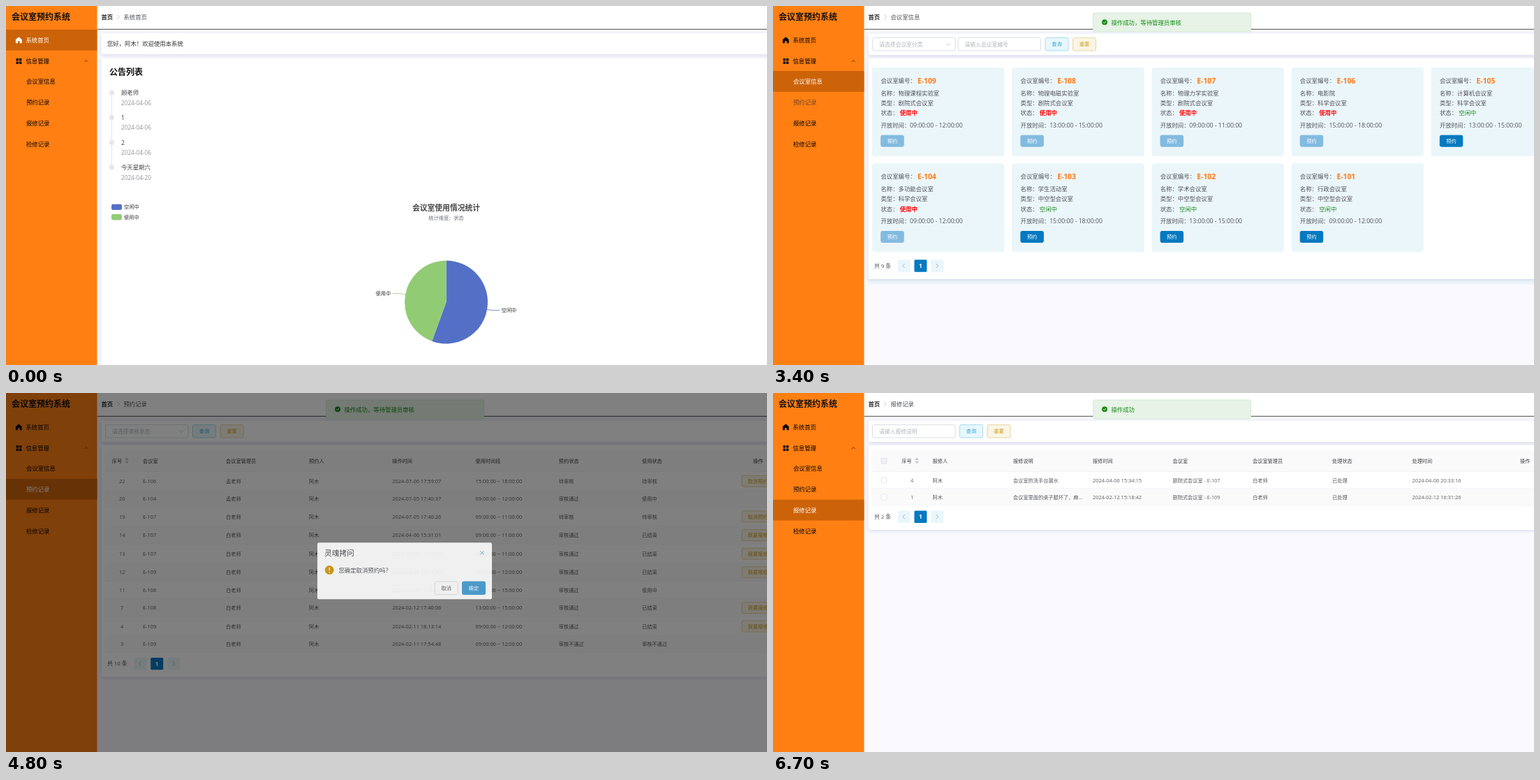
Animation, 1090 px wide and 514 px high, one loop 8 s. Source, as an HTML page:

```html
<!DOCTYPE html>
<html>
<head>
<meta charset="utf-8">
<title>会议室预约系统</title>
<style>
html, body { margin: 0; width: 100%; height: 100%; overflow: hidden; background: #f9f9fe; }
svg { display: block; width: 1090px; height: 514px; font-family: "Open Sans", "Noto Sans CJK SC", "Noto Sans CJK", sans-serif; }
.panel { fill: #fff; filter: drop-shadow(0 1px 2.5px rgba(80, 90, 160, .22)); }
</style>
</head>
<body>
<svg id="stage" viewBox="0 0 1090 514"></svg>
<script>
const LOOP = 8000;
const BLUE = '#0579c1', PALE = '#e9f6fb', GOLD = '#d0980f';
const USER = '阿木', MANAGERS = ['孟老师', '白老师'];

// ---------- drawing helpers ----------
const isLatin = s => /^[\x20-~]+$/.test(s);

function text(x, y, s, size = 8.4, fill = '#505256', extra = '') {
  const px = isLatin(s) ? size * 1.03 : size;
  return `<text x="${x}" y="${y + size * .37}" font-size="${px}" fill="${fill}" ${extra}>${s}</text>`;
}
const MID = 'text-anchor="middle"', BOLD = 'font-weight="700"', MEDIUM = 'font-weight="500"';

const rect = (x, y, w, h, fill, rx = 0, extra = '') =>
  `<rect x="${x}" y="${y}" width="${w}" height="${h}" fill="${fill}" rx="${rx}" ${extra}/>`;
const line = (d, stroke, width = .8, extra = '') =>
  `<path d="${d}" fill="none" stroke="${stroke}" stroke-width="${width}" ${extra}/>`;
const group = (id, body, extra = '') => `<g id="${id}" ${extra}>${body}</g>`;
const panel = (top, bottom) => `<rect class="panel" x="136.5" y="${top}" width="970" height="${bottom - top}" rx="2"/>`;

function button(x, y, w, h, label, bg, ink, border = bg, extra = '') {
  return rect(x + .5, y + .5, w - 1, h - 1, bg, 2, `stroke="${border}"`) +
    text(x + w / 2, y + h / 2, label, 7.2, ink, MID + ' ' + extra);
}
const goldButton = (x, y, w, h, label) => button(x, y, w, h, label, '#faf5e4', '#cf9a1c', '#e8d6a6', MEDIUM);

const field = (x, hint) =>
  rect(x + .5, 45.5, 118.5, 18.5, '#fff', 2, 'stroke="#dcdfe6"') + text(x + 10, 54.7, hint, 7.8, '#b3b6be');
const arrowDown = line('M248 53.5l3 3 3-3', '#b3b6be');
const searchButtons = x =>
  button(x, 45, 34, 19.5, '查询', '#e8f7fc', '#2fa6d4', '#a6ddee', MEDIUM) + goldButton(x + 39.5, 45, 34, 19.5, '重置');

function pager(count, y) {
  const x = count > 9 ? 183.5 : 178.7;
  return text(145, y, `共 ${count} 条`, 7.8) +
    rect(x, y - 8.7, 18, 17.4, PALE, 1.5) + line(`M${x + 10} ${y - 3}l-3 3 3 3`, '#9aa4b4') +
    rect(x + 23.7, y - 8.7, 18, 17.4, BLUE, 1.5) + text(x + 32.7, y, '1', 8, '#fff', MID + ' ' + BOLD) +
    rect(x + 47.5, y - 8.7, 18, 17.4, PALE, 1.5) + line(`M${x + 55} ${y - 3}l3 3-3 3`, '#9aa4b4');
}
const sorter = x => `<path d="M${x - 3} 96l3-3.2 3 3.2zM${x - 3} 97.8l3 3.2 3-3.2z" fill="#c0c4cc"/>`;

// ---------- sidebar and header ----------
const MENU = [['系统首页', 48.7], ['会议室信息', 107.9], ['预约记录', 137.8], ['报修记录', 167.6], ['检修记录', 197.4]];

const sidebar = rect(0, 0, 130.5, 514, '#ff7f12') +
  text(8, 16, '会议室预约系统', 12, '#111', BOLD) +
  MENU.map(([, y], i) => rect(0, y - 14.9, 130.5, 29.8, '#cc6309', 0, `id="bar${i}"`)).join('') +
  MENU.map(([s, y], i) => text(i ? 29 : 28.5, y, s, 8.4, '#000', `id="item${i}"`)).join('') +
  '<path id="house" d="M18.3 44.3l4.4 3.8v5.2h-3v-3h-2.8v3h-3v-5.2z"/>' +
  [0, 1, 2, 3].map(i => rect(14.5 + i % 2 * 4.4, 75 + (i >> 1) * 4.4, 3.5, 3.5, '#111', .5)).join('') +
  text(28.5, 78.7, '信息管理', 8.4, '#000') + line('M112.5 80.2l2.6-2.6 2.6 2.6', '#4a2a0c');

const header = rect(130.5, 0, 960, 33, '#fff') + rect(130.5, 32.8, 960, 1, '#4b4d50') +
  text(136.5, 15.6, '首页', 8.4, '#303133', BOLD) + line('M159.5 12.5l3 3.2-3 3.2', '#b8bcc5') +
  MENU.slice(0, 4).map(([s], i) => group('crumb' + i, text(168.5, 15.6, s))).join('');

// ---------- pages ----------
function homePage() {
  const notices = [['顾老师', '2024-04-06'], ['1', '2024-04-06'], ['2', '2024-04-06'], ['今天星期六', '2024-04-20']];
  const cx = 630.5, cy = 424, r = 59.5, a = Math.PI * 10 / 9;
  const end = `${cx + r * Math.sin(a)} ${cy - r * Math.cos(a)}`;
  return panel(39, 69) + text(145, 54.3, `您好，${USER}！欢迎使用本系统`, 8.4, '#303133') + panel(74.5, 530) +
    text(148, 95, '公告列表', 12, '#111', BOLD) + rect(150.8, 124, 1.3, 107, '#e4e7ed') +
    notices.map(([s, day], i) => {
      const y = 124 + i * 35.7;
      return `<circle cx="151.5" cy="${y}" r="3.6" fill="#e4e7ed"/>` +
        text(165, y, s, 8.4, '#404246') + text(165, y + 14.6, day, 8, '#909399');
    }).join('') +
    rect(151, 283.7, 15, 8.4, '#5470c6', 2.4) + text(169, 287.6, '空闲中', 7.2, '#333') +
    rect(151, 298, 15, 8.4, '#91cc75', 2.4) + text(169, 302, '使用中', 7.2, '#333') +
    text(cx, 289, '会议室使用情况统计', 10.8, '#464646', MID + ' ' + BOLD) +
    text(cx, 303.6, '统计维度：状态', 7.2, '#6e7079', MID) +
    `<path d="M${cx} ${cy}V${cy - r}A${r} ${r} 0 1 1 ${end}z" fill="#5470c6"/>` +
    `<path d="M${cx} ${cy}V${cy - r}A${r} ${r} 0 0 0 ${end}z" fill="#91cc75"/>` +
    line('M572 413.5Q566 411.6 563 411.6H554', '#91cc75') + text(529.5, 411.2, '使用中', 7.2, '#333') +
    line('M689 434.3Q694 435.8 698 435.8H707', '#5470c6') + text(709.7, 435.2, '空闲中', 7.2, '#333') +
    '<path d="M1091 9.5l-2 2-3 1.5 2 2.5 1 4h2z" fill="#86c932"/>';
}

const ROOMS = `物理课程实验室,剧院式,1,09:00:00 - 12:00:00
物理电磁实验室,剧院式,1,13:00:00 - 15:00:00
物理力学实验室,剧院式,1,09:00:00 - 11:00:00
电影院,科学,0,15:00:00 - 18:00:00
计算机会议室,科学,0,13:00:00 - 15:00:00
多功能会议室,科学,1,09:00:00 - 12:00:00
学生活动室,中空型,0,15:00:00 - 18:00:00
学术会议室,中空型,0,13:00:00 - 15:00:00
行政会议室,中空型,0,09:00:00 - 12:00:00`.split('\n').map(s => s.split(','));

const cardAt = i => [142 + i % 5 * 200.15, i < 5 ? 88 : 225.3];

function roomState(i, busy) {
  const [x, y] = cardAt(i);
  return text(x + 39.7, y + 65.3, busy ? '使用中' : '空闲中', 8.4, busy ? '#f00' : '#1c8a1c', busy ? BOLD : MEDIUM) +
    button(x + 12.2, y + 96.7, 33.5, 17, '预约', busy ? '#82bbe0' : BLUE, '#fff');
}

function roomCard([name, type, busy, hours], i) {
  const [x, y] = cardAt(i), tx = x + 12.4;
  const state = i === 3 ? group('free', roomState(i, false)) + group('taken', roomState(i, true)) : roomState(i, busy === '1');
  return rect(x, y, 189.5, 127, '#ebf6fb', 4) + text(tx, y + 19, '会议室编号：') +
    text(x + 65, y + 18.8, 'E-' + (109 - i), 10, '#ff7a14', BOLD) +
    text(tx, y + 36.8, '名称：' + name) + text(tx, y + 51, `类型：${type}会议室`) + text(tx, y + 65.3, '状态：') +
    text(tx, y + 82.4, '开放时间：') + text(x + 54, y + 82.4, hours) + state;
}

const roomsPage = () => rect(136.5, 391, 960, 8, '#edf5fb') + panel(39.5, 70) + field(142, '请选择会议室分类') + arrowDown +
  field(264.5, '请输入会议室编号') + searchButtons(389.5) + panel(74.5, 391) +
  group('cards', ROOMS.map(roomCard).join('') + pager(9, 372));

const HEAD_END = 112.9;
const tableHead = (xs, names) => rect(142, 82, 950, HEAD_END - 82, '#fafafb') +
  names.map((s, i) => text(xs[i], 97.5, s, 7.2, '#404246', MEDIUM)).join('') + rect(142, HEAD_END - .4, 950, .6, '#ebeef5');

const RECORDS = `22,E-106,0,2024-07-06 17:59:07,15:00:00 ~ 18:00:00,待审核,待审核,取消预约
20,E-104,0,2024-07-05 17:40:37,09:00:00 ~ 12:00:00,审核通过,使用中,
19,E-107,1,2024-07-05 17:40:26,09:00:00 ~ 11:00:00,待审核,待审核,取消预约
14,E-107,1,2024-04-06 15:31:01,09:00:00 ~ 11:00:00,审核通过,已结束,我要报修
13,E-107,1,2024-04-06 13:17:59,09:00:00 ~ 11:00:00,审核通过,已结束,我要报修
12,E-109,1,2024-04-06 13:17:40,09:00:00 ~ 12:00:00,审核通过,已结束,我要报修
11,E-108,1,2024-04-06 10:38:02,13:00:00 ~ 15:00:00,审核通过,使用中,
7,E-108,1,2024-02-12 17:40:06,13:00:00 ~ 15:00:00,审核通过,已结束,我要报修
4,E-109,1,2024-02-11 18:13:14,09:00:00 ~ 12:00:00,审核通过,已结束,我要报修
3,E-109,1,2024-02-11 17:54:48,09:00:00 ~ 12:00:00,审核不通过,审核不通过,`.split('\n').map(s => s.split(','));

function recordTable(rows, prefix) {
  const xs = [196, 315, 434, 553.3, 672.5, 791.8, 911];
  let y = HEAD_END, body = '';
  rows.forEach(([id, room, who, when, slot, review, use, action], i) => {
    const h = action ? 26.6 : 24.1, c = y + h / 2;
    const cells = [room, MANAGERS[who], USER, when, slot, review, use];
    body += rect(142, y, 950, h, i % 2 ? '#fafafa' : '#fff') +
      rect(142, y, 950, h, '#f3f5f9', 0, `id="${prefix}${id}" opacity="0"`) +
      rect(142, y + h - .5, 950, .6, '#ebeef5') + text(166.2, c, id, 7.2, '#606266', MID) +
      cells.map((s, k) => text(xs[k], c, s, 7.2, '#5a5c60')).join('') +
      (action ? goldButton(1053.5, c - 8.5, 47, 17, action) : '');
    y += h;
  });
  return panel(74.5, y + 35) +
    tableHead([151.7, ...xs, 1070], ['序号', '会议室', '会议室管理员', '预约人', '操作时间', '使用时间段', '预约状态', '使用状态', '操作']) +
    sorter(173) + body + pager(rows.length, y + 16.2);
}

const recordsPage = () => panel(39.5, 70) + field(142, '请选择审核状态') + arrowDown + searchButtons(267) +
  group('before', recordTable(RECORDS, 'row') +
    group('cancel', button(1053.5, 117.7, 47, 17, '取消预约', GOLD, '#fff'))) +
  group('after', recordTable(RECORDS.slice(1), 'late'));

function reportsPage() {
  const xs = [228.5, 344, 458, 572.5, 687, 801, 915.5];
  const rows = [
    ['4', USER, '会议室的洗手台漏水', '2024-04-06 15:34:15', '剧院式会议室 - E-107', MANAGERS[1], '已处理', '2024-04-06 20:33:16'],
    ['1', USER, '会议室里面的桌子腿坏了，麻…', '2024-02-12 15:18:42', '剧院式会议室 - E-109', MANAGERS[1], '已处理', '2024-02-12 16:31:26']];
  const check = (y, fill) => rect(155, y - 4, 8, 8, fill, 1, 'stroke="#dcdfe6" stroke-width=".8"');
  return panel(39.5, 70) + field(142, '请输入报修说明') + searchButtons(267) + panel(74.5, 196) +
    tableHead([184.3, ...xs, 1070], ['序号', '报修人', '报修说明', '报修时间', '会议室', '会议室管理员', '处理状态', '处理时间', '操作']) +
    sorter(206) + check(97.3, '#eef0f7') +
    group('reports', rows.map(([id, ...cells], i) => {
      const c = HEAD_END + 24.1 * (i + .5);
      return rect(142, c - 12, 950, 24, i ? '#fafafa' : '#fff') + rect(142, c + 11.6, 950, .6, '#ebeef5') +
        check(c, '#fff') + text(199, c, id, 7.2, '#606266', MID) +
        cells.map((s, k) => text(xs[k], c, s, 7.2, '#5a5c60')).join('');
    }).join('') + pager(2, 177.2));
}

// ---------- overlays ----------
const toast = (id, s) => group(id, rect(458.5, 10, 226, 27, '#e6f3e6', 2, 'stroke="#cde5cd" stroke-width=".8"') +
  '<circle cx="475" cy="23.2" r="3.9" fill="#158a15"/>' + line('M473.2 23.3l1.3 1.3 2.4-2.6', '#fff', .9) +
  text(484.5, 23.4, s, 8.4, '#158a15'));

const dialog = rect(446, 216.5, 250, 81, '#fff', 2) + text(456, 231.7, '灵魂拷问', 10.7, '#404246') +
  line('M679.2 228.2l5.6 5.6m0-5.6l-5.6 5.6', '#2fa6d4') +
  `<circle cx="463.2" cy="255.7" r="6.4" fill="${GOLD}"/>` + line('M463.2 252v4.6m0 1.5v1.4', '#fff', 1.3) +
  text(476.5, 255.7, '您确定取消预约吗？') +
  button(613.7, 271.8, 34, 19.5, '取消', '#fff', '#606266', '#dcdfe6') +
  button(653, 271.8, 34, 19.5, '确定', '#469ed3', '#fff', '#469ed3', MEDIUM);

document.getElementById('stage').innerHTML = rect(0, 0, 1090, 514, '#f9f9fe') +
  [homePage, roomsPage, recordsPage, reportsPage].map((make, i) => group('page' + i, make())).join('') +
  header + sidebar + toast('booked', '操作成功，等待管理员审核') +
  rect(0, 0, 1090, 514, '#000', 0, 'id="shade"') + group('dialog', dialog) + toast('cancelled', '操作成功');

// ---------- motion ----------
const $ = id => document.getElementById(id);
const clamp = v => Math.min(1, Math.max(0, v));

// cubic-bezier(.25, .1, .25, 1)
function ease(x) {
  let lo = 0, hi = 1, u = .5;
  for (let i = 0; i < 18; i++) {
    u = (lo + hi) / 2;
    const bx = .75 * u * (1 - u) + u ** 3;
    if (bx < x) lo = u; else hi = u;
  }
  return .3 * u * (1 - u) ** 2 + 3 * u * u * (1 - u) + u ** 3;
}
const ramp = (t, from, ms) => t <= from ? 0 : t >= from + ms ? 1 : ease(clamp((t - from) / ms));
const pulse = (t, from, to, ms) => ramp(t, from, ms) - ramp(t, to, ms);

const show = (id, on) => $(id).setAttribute('display', on ? 'inline' : 'none');
const fade = (id, v) => { show(id, v > .002); $(id).setAttribute('opacity', v); };
const shift = (id, x, y) => $(id).setAttribute('transform', `translate(${x} ${y})`);
const blend = (a, b, k) => a.map((v, i) => v + (b[i] - v) * k);

const OPEN = [-1000, 560, 3560, 6260, 9999];
const HOVER = [[], [[440, 560]], [[3270, 3560]], [[3170, 3270], [6100, 6260]], [[3050, 3170], [5980, 6100]]];
const ROW_HOVER = { 14: [3950, 4150], 20: [4150, 4350], 22: [4350, 4640] };

function setToast(id, t, from, to) {
  fade(id, pulse(t, from, to, 300));
  shift(id, 0, -27 * (1 - pulse(t, from, to, 400)));
}

function render(t) {
  MENU.forEach((_, i) => {
    const on = i < 4 ? pulse(t, OPEN[i], OPEN[i + 1], 260) : 0;
    const hot = HOVER[i].reduce((sum, [a, b]) => sum + pulse(t, a, b, 120), 0);
    const ink = `rgb(${blend(blend([10, 8, 6], [112, 71, 42], hot), [255, 255, 255], on)})`;
    fade('bar' + i, on);
    $('item' + i).setAttribute('fill', ink);
    if (!i) $('house').setAttribute('fill', ink);
    if (i > 3) return;
    const here = t >= OPEN[i] && t < OPEN[i + 1];
    show('page' + i, here);
    const enter = ramp(t, OPEN[i], 300);
    fade('crumb' + i, here ? enter : 0);
    shift('crumb' + i, 12 * (1 - enter), 0);
  });

  fade('cards', ramp(t, 700, 300));
  show('free', t < 2290);
  show('taken', t >= 2290);
  show('before', t < 5450);
  show('after', t >= 5450);
  fade('reports', ramp(t, 6340, 200));
  fade('cancel', pulse(t, 4360, 4640, 120));
  for (const id in ROW_HOVER) fade('row' + id, pulse(t, ...ROW_HOVER[id], 60));

  setToast('booked', t, 2240, 5230);
  setToast('cancelled', t, 5490, 8500);
  fade('shade', .5 * pulse(t, 4620, 5440, 200));
  const open = pulse(t, 4620, 5440, 300);
  fade('dialog', open);
  shift('dialog', 0, -20 * (1 - open));
}

const start = performance.now();
function tick() {
  render((performance.now() - start) % LOOP);
  requestAnimationFrame(tick);
}
tick();
</script>
</body>
</html>
```
